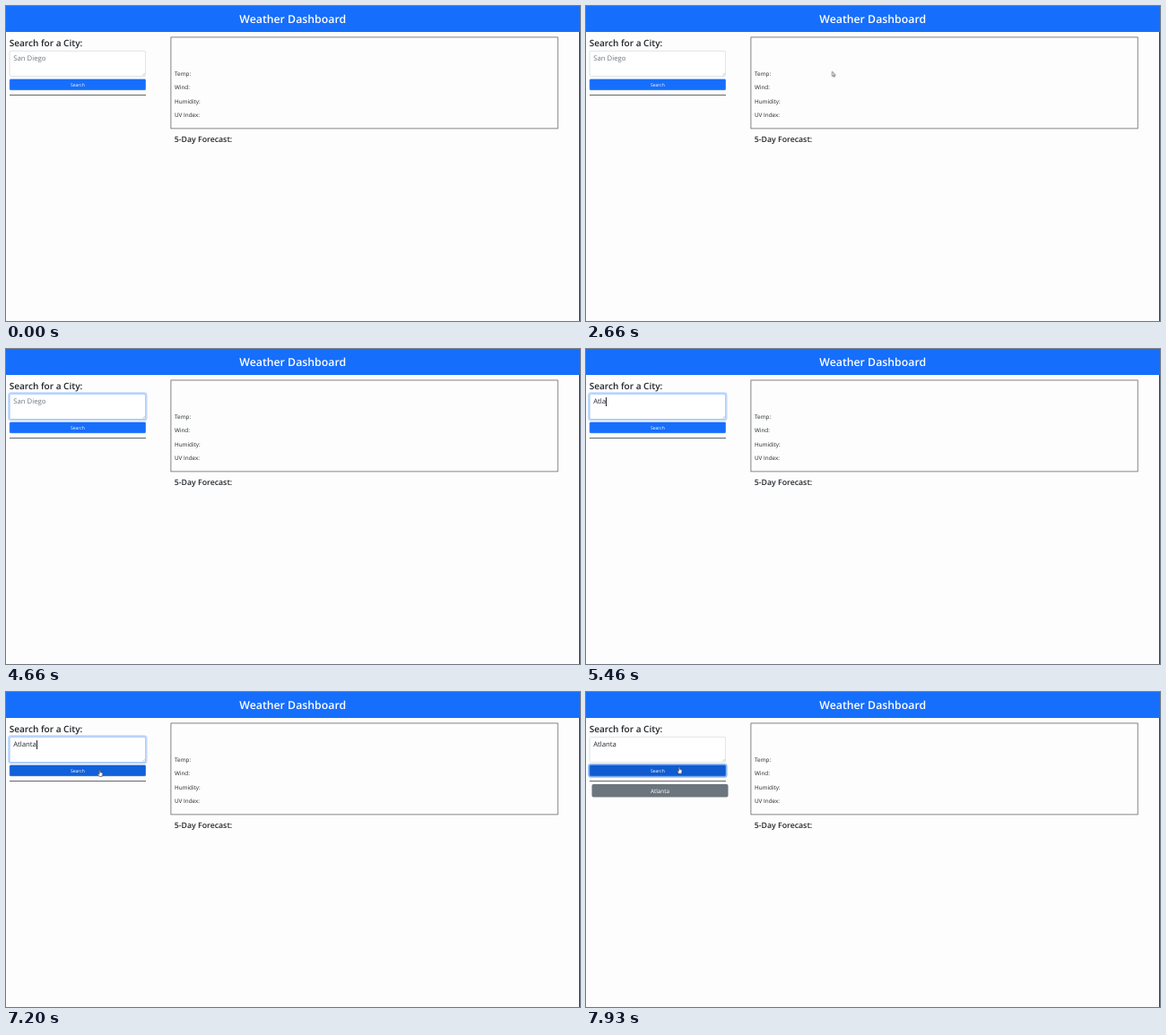
Recreate the animation shown at these times as an HTML page. Size 640 by 352 pixels, loop 8000 ms.

```html
<!DOCTYPE html>
<html lang="en">
<head>
<meta charset="utf-8">
<title>Weather Dashboard</title>
<style>
  html, body { margin: 0; width: 100%; height: 100%; overflow: hidden; background: #fdfdfd; }
  body { position: relative; font-family: "Open Sans", "Noto Sans", sans-serif; color: #212529; }
  svg { position: absolute; left: 0; top: 0; display: block; }
  text { fill: #212529; text-rendering: geometricPrecision; }
  .head { font-weight: 600; }
  .label { font-size: 6.35px; }
  .light { fill: #fff; }
  .mid { text-anchor: middle; }

  /* one shared 8 s timeline: 1% = 80 ms */
  .anim, .typed::before { animation: 8s linear infinite; }
  .step, .typed::before { animation-timing-function: step-end; }

  .field { fill: #fff; stroke: #d3d8dd; stroke-width: .7; animation-name: field; }
  .ring { fill: none; stroke: #0d6efd; stroke-width: 1.9; animation-name: ring; }
  .button { fill: #166efc; stroke: #166efc; stroke-width: .6; animation-name: button; }
  .glow { fill: none; stroke: #3184fd; stroke-width: 1.8; animation-name: glow; }
  .city { animation-name: city; }
  .cursor path { fill: #fff; stroke: #222; stroke-width: .55; stroke-linejoin: round; }
  .arrow { animation-name: arrow; }
  .arrow-show { animation-name: arrowShow; }
  .hand { animation-name: hand; }
  .hand-show { animation-name: handShow; }

  .entry { position: absolute; left: 8.2px; top: 54px; height: 10px; font-size: 7.75px;
           line-height: 10px; white-space: pre; text-rendering: geometricPrecision; }
  .hint { color: #6c757d; animation-name: hint; }
  .typed::before { content: ""; animation-name: type; }
  .caret { position: absolute; left: 100%; top: 0; width: .8px; height: 9.5px;
           background: #212529; animation-name: caret; }

  @keyframes field {
    0%, 49.3% { stroke: #d3d8dd; }
    50.6%, 93.25% { stroke: #86b7fe; }
    95%, 100% { stroke: #d3d8dd; }
  }
  @keyframes ring {
    0%, 49.5% { opacity: 0; }
    50.7%, 93.25% { opacity: .25; }
    95%, 100% { opacity: 0; }
  }
  @keyframes hint {
    0% { opacity: 1; }
    62.4%, 100% { opacity: 0; }
  }
  @keyframes type {
    0% { content: ""; }
    62.4% { content: "A"; }
    64.9% { content: "At"; }
    67.4% { content: "Atl"; }
    68.1% { content: "Atla"; }
    69.9% { content: "Atlan"; }
    71.6% { content: "Atlant"; }
    74%, 100% { content: "Atlanta"; }
  }
  @keyframes caret {
    0% { opacity: 0; }
    49.1% { opacity: 1; }
    54.1% { opacity: 0; }
    60.7% { opacity: 1; }
    80% { opacity: 0; }
    86.6% { opacity: 1; }
    93.25%, 100% { opacity: 0; }
  }
  @keyframes button {
    0%, 86.6% { fill: #166efc; stroke: #166efc; }
    88.5%, 93.25% { fill: #1061da; stroke: #1059cc; }
    95.1%, 100% { fill: #105bcf; stroke: #0c50b8; }
  }
  @keyframes glow {
    0%, 93.25% { opacity: 0; }
    95.1%, 100% { opacity: .55; }
  }
  @keyframes city {
    0% { opacity: 0; }
    94.9%, 100% { opacity: 1; }
  }
  @keyframes arrow {
    0%, 23.25% { transform: translate(640px, 152px); animation-timing-function: ease-out; }
    30%, 33.25% { transform: translate(274.5px, 73.2px); animation-timing-function: ease-in-out; }
    40%, 100% { transform: translate(150px, 64px); }
  }
  @keyframes arrowShow {
    0% { opacity: 0; }
    23.25% { opacity: 1; }
    39.4%, 100% { opacity: 0; }
  }
  @keyframes hand {
    0%, 86.5% { transform: translate(97px, 81px); animation-timing-function: ease-out; }
    89.8%, 92% { transform: translate(104.6px, 87px); }
    95%, 100% { transform: translate(104px, 83.7px); }
  }
  @keyframes handShow {
    0% { opacity: 0; }
    86.5%, 100% { opacity: 1; }
  }
</style>
</head>
<body>
<svg width="640" height="352" viewBox="0 0 640 352">
  <rect width="640" height="29" fill="#166efc"/>
  <rect x="639.1" y="29" width=".9" height="323" fill="#222"/>
  <text class="head light mid" x="319.7" y="18.6" font-size="12.3">Weather Dashboard</text>

  <text class="head" x="3.7" y="45.3" font-size="10.05">Search for a City:</text>
  <rect class="anim ring" x="3.1" y="49.3" width="153.5" height="30" rx="2.4"/>
  <rect class="anim field" x="4.1" y="50.3" width="151.5" height="28.2" rx="1.6"/>
  <path d="M152.4 77.4l2.3-2.3M153.9 77.5l.9-.9" stroke="#777" stroke-width=".4"/>

  <rect class="anim glow" x="3.1" y="80.8" width="153.6" height="14" rx="2"/>
  <rect class="anim button" x="4.2" y="81.9" width="151.4" height="11.8" rx="1"/>
  <text class="light mid" x="79.9" y="89.6" font-size="5.05">Search</text>
  <rect x="4" y="99.1" width="152" height="1" fill="#5c5f62"/>
  <g class="anim step city">
    <rect x="6.5" y="103" width="152" height="14.6" rx="1.8" fill="#6c757d"/>
    <text class="label light mid" x="82.5" y="113">Atlanta</text>
  </g>

  <rect x="183.9" y="34.9" width="431.3" height="102" fill="none" stroke="#666" stroke-width=".8"/>
  <g class="label">
    <text x="188" y="77.9">Temp:</text>
    <text x="188" y="93.2">Wind:</text>
    <text x="188" y="108.5">Humidity:</text>
    <text x="188" y="123.8">UV Index:</text>
  </g>
  <text class="head" x="187.8" y="151.7" font-size="8.75">5-Day Forecast:</text>
</svg>

<div class="entry anim step hint">San Diego</div>
<div class="entry typed"><i class="anim step caret"></i></div>

<svg class="cursor" width="640" height="352" viewBox="0 0 640 352">
  <g class="anim step arrow-show">
    <path class="anim arrow" d="M0 0V5.3L1.2 4.2 2 6.1 2.9 5.7 2.1 3.9H3.7Z"/>
  </g>
  <g class="anim step hand-show">
    <path class="anim hand" d="M-.7 .5Q0-.4 .6 .5V2.8L2.6 3.2Q3.2 3.4 3.1 4.2L2.6 7.4H-.6L-2.3 4.9Q-2.2 4-1.4 4.4L-.7 5Z"/>
  </g>
</svg>
</body>
</html>
```
